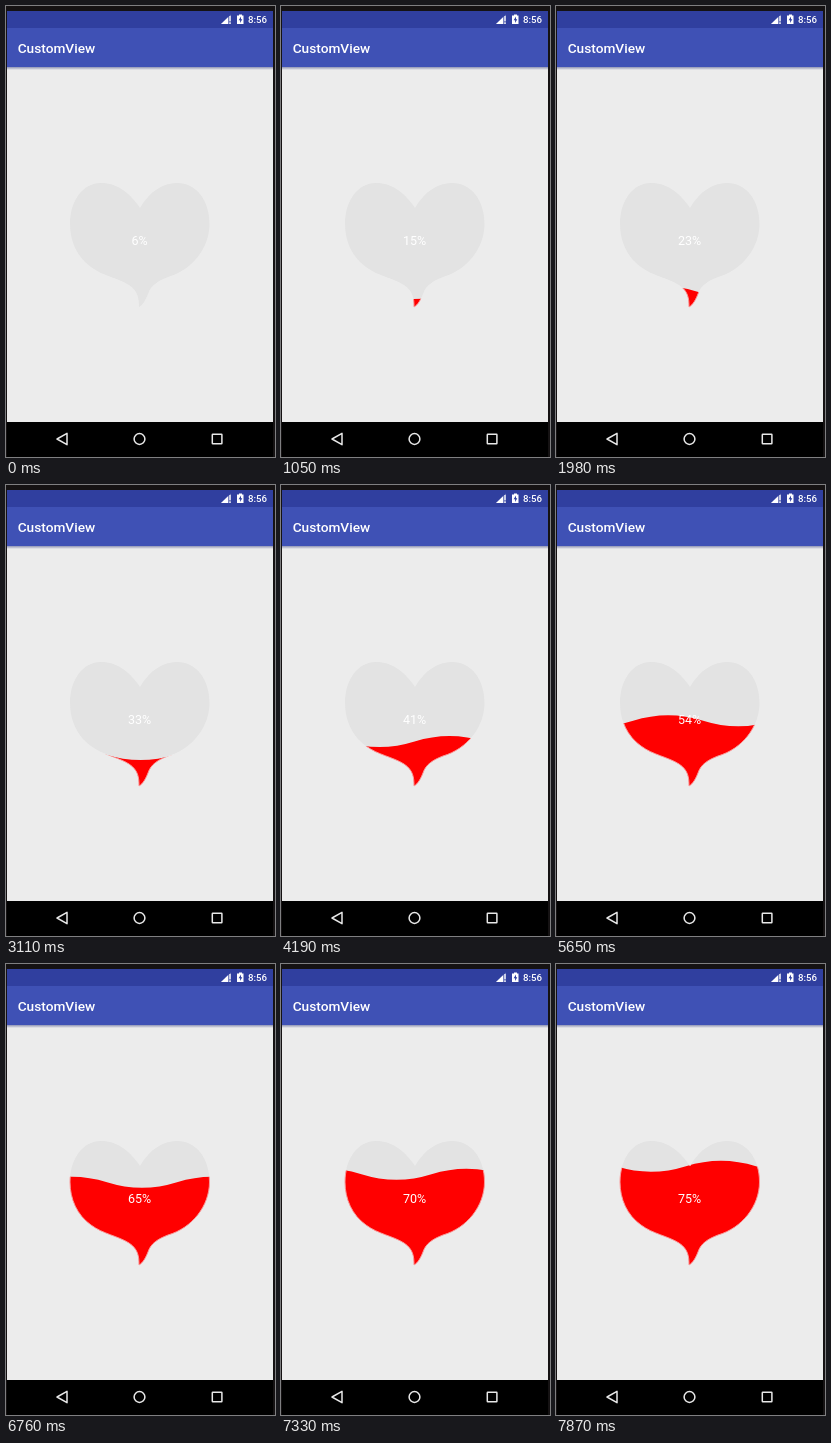
These frames come from a looping animation (269x451 px, 7.99 s). An HTML page:

```html
<!DOCTYPE html>
<html lang="en">
<head>
<meta charset="utf-8">
<title>Heart progress</title>
<style>
  html, body { margin: 0; width: 100%; height: 100%; overflow: hidden; background: #111; }
  svg { display: block; width: 100%; height: 100%; }
  text { font-family: Roboto, "Open Sans", sans-serif; fill: #fff; }
</style>
</head>
<body>
<svg viewBox="0 0 269 451">
  <defs>
    <linearGradient id="shade" x1="0" y1="0" x2="0" y2="1">
      <stop offset="0" stop-color="#8f94b5"/>
      <stop offset="1" stop-color="#ececec"/>
    </linearGradient>
    <path id="heart" d="M134 202C121 183 108 177 95 177C76 177 64 196 64 218
      C64 235 71 251 85 261C97 270 112 272 123 279C132 285 133 292 133 301
      C137 299 140 293 142 288C145 279 152 275 162 271C186 264 203.5 242 203.5 218
      C203.5 195 191 177 171 177C157 177 144 185 134 202Z"/>
    <clipPath id="water"><path id="wave"/></clipPath>
  </defs>

  <rect width="269" height="451" fill="#151213"/>
  <rect x="1" y="5" width="266" height="18" fill="#303f9f"/>
  <rect x="1" y="22" width="266" height="39" fill="#3f51b5"/>
  <rect x="1" y="61" width="266" height="355" fill="#ececec"/>
  <rect x="1" y="61" width="266" height="3" fill="url(#shade)"/>
  <rect x="1" y="416" width="266" height="35" fill="#000"/>

  <!-- status bar -->
  <path d="M215 18L225 8.5V18Z" fill="#fff" fill-opacity=".35"/>
  <path d="M215 18L222 11.3V18Z" fill="#fff"/>
  <path d="M224 10V15M224 16.4V18" stroke="#fff" stroke-width="1.2"/>
  <path d="M231 9.5H233V8.5H236V9.5H237.5V18H231Z" fill="#fff"/>
  <path d="M235 10.5L232.6 14.2H234.1V17L236.3 13.2H235Z" fill="#303f9f"/>
  <text x="242" y="17.3" font-size="9.7" font-weight="500">8:56</text>

  <text x="11.7" y="47" font-size="13.7" font-weight="500">CustomView</text>

  <!-- navigation bar -->
  <g fill="none" stroke="#e8e8e8" stroke-width="1.5" stroke-linejoin="round">
    <path d="M51 433L61 427.3V438.7Z"/>
    <circle cx="133.5" cy="433" r="5.4"/>
    <rect x="206.3" y="428.2" width="9.6" height="9.6" rx=".5"/>
  </g>

  <use href="#heart" fill="#e3e3e3"/>
  <g clip-path="url(#water)">
    <use href="#heart" fill="#f00" stroke="#f99a9a" stroke-width="1"/>
  </g>
  <text id="label" x="133.5" y="239" font-size="12.5" text-anchor="middle"></text>
</svg>
<script>
  const LOOP = 7990;
  const WAVE = 140, AMP = 5.5, DRIFT = 5.13;
  // Runs of screen updates: first time, last time, count
  const runs = [
    [120, 1050, 8], [1170, 2100, 8], [2250, 3250, 8], [3370, 4330, 8],
    [4450, 5410, 8], [5530, 6490, 8], [6610, 7600, 8], [7750, 7870, 2]
  ];
  const ticks = [0];
  for (const [from, to, count] of runs)
    for (let i = 0; i < count; i++) ticks.push(from + (to - from) * i / (count - 1));

  const wave = document.getElementById('wave');
  const label = document.getElementById('label');

  function wavePath(level, trough) {
    const half = WAVE / 2;
    let x = trough - half / 2;
    while (x > 0) x -= WAVE;
    let d = `M${x} ${level}q${half / 2} ${2 * AMP} ${half} 0`;
    for (let i = 0; i < 6; i++) d += `t${half} 0`;
    return d + 'V460H-200Z';
  }

  function draw(time) {
    let step = ticks.length - 1;
    while (ticks[step] > time + 0.01) step--;
    const percent = Math.floor(6.4 + ticks[step] * 0.00877);
    const level = 202.2 + (75 - percent) * 1.6;
    const trough = 134.5 - DRIFT * (step - 23);
    wave.setAttribute('d', wavePath(level, trough));
    label.textContent = percent + '%';
  }

  const start = performance.now();
  function loop() {
    draw((performance.now() - start) % LOOP);
    requestAnimationFrame(loop);
  }
  loop();
</script>
</body>
</html>
```
